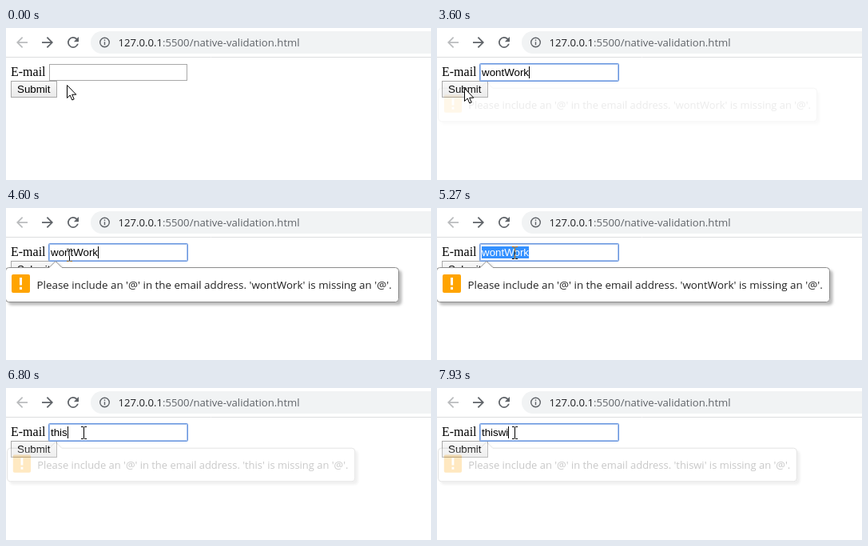
Recreate the animation shown at these times as an HTML page. Size 532 by 190 pixels, loop 8 s.

```html
<!DOCTYPE html>
<html lang="en">
<head>
<meta charset="utf-8">
<title>Native form validation</title>
<style>
  html, body { margin: 0; width: 100%; height: 100%; overflow: hidden; background: #fff; }
  svg { display: block; width: 532px; height: 190px; }
  .ui { font-family: "Open Sans", "Noto Sans", sans-serif; }
  .control { font: 13.333px "Liberation Sans", Arial, sans-serif; }
  .label { font: 16px "Liberation Serif", "Times New Roman", serif; }
  #ibeam { mix-blend-mode: difference; }
</style>
</head>
<body>
<svg viewBox="0 0 532 190">
  <defs>
    <linearGradient id="face" x2="0" y2="1">
      <stop stop-color="#f9f9f9"/><stop offset="1" stop-color="#e9e9e9"/>
    </linearGradient>
    <filter id="shadow" x="-5%" y="-20%" width="112%" height="160%">
      <feDropShadow dx="3.5" dy="3.5" stdDeviation="1.8" flood-opacity=".26"/>
    </filter>
    <path id="leftArrow" d="M8 -1H-4.2L1.4 -6.6L0 -8L-8 0L0 8L1.4 6.6L-4.2 1H8Z"/>
  </defs>
  <rect width="532" height="190" fill="#fff"/>

  <!-- Browser toolbar -->
  <path d="M0 36.5H532" stroke="#dcdddf"/>
  <use href="#leftArrow" transform="translate(20 18) scale(.875)" fill="#babcbe"/>
  <use href="#leftArrow" transform="translate(52 18) scale(-.875 .875)" fill="#5f6368"/>
  <path transform="translate(84 18) scale(.875)" fill="#5f6368"
    d="M5.65 -5.65A8 8 0 1 0 7.73 2H5.65A6 6 0 1 1 4.22 -4.22L1 -1H8V-8Z"/>
  <rect x="106" y="4" width="460" height="28" rx="14" fill="#f1f3f4"/>
  <g fill="none" stroke="#5f6368" stroke-width="1.4">
    <circle cx="123.5" cy="18" r="5.8"/>
    <path d="M123.5 17.2V21.2M123.5 14.6V16"/>
  </g>
  <text class="ui" x="140.5" y="23" font-size="13.15" fill="#5f6368"><tspan fill="#202124">127.0.0.1</tspan>:5500/native-validation.html</text>

  <!-- Form -->
  <text class="label" x="6" y="60">E-mail</text>
  <rect x="6.5" y="66.5" width="57" height="20" fill="url(#face)" stroke="#a9a9a9"/>
  <text class="control" x="14" y="81">Submit</text>
  <rect x="54.5" y="45.5" width="172" height="20" fill="#fff" stroke="#a9a9a9"/>
  <g id="focus" fill="none">
    <rect x="54.5" y="45.5" width="172" height="20" stroke="#a8c3ee"/>
    <rect x="53.5" y="44.5" width="174" height="22" rx="1" stroke="#6795de"/>
  </g>
  <rect id="selection" x="56" y="48" height="15" fill="#3390ff"/>
  <text id="value" class="control" x="56" y="60"></text>
  <rect id="caret" y="48" width="1" height="15"/>
  <rect id="suggestions" x="53.5" y="67.5" width="203" height="130" fill="#fff" stroke="#c8c8c8"/>

  <g id="bubble">
    <path id="frame" fill="#fff" stroke="#8c8c8c" filter="url(#shadow)"/>
    <rect x="7" y="83" width="23" height="23" rx="2" fill="#ffa400"/>
    <path d="M17 87H20V96.5H17ZM17 98.8H20V102H17Z" fill="#fff"/>
    <text id="message" class="ui" x="38.5" y="101" font-size="13.38" fill="#222"></text>
  </g>

  <path id="arrow" d="M.5 .5V16.5L4.2 13L6.8 19L9.2 18L6.7 12.2H11.8Z" fill="#fff" stroke="#000"/>
  <path id="ibeam" d="M-3.5 -7.5H-1L0 -6.8L1 -7.5H3.5M0 -7V7M-3.5 7.5H-1L0 6.8L1 7.5H3.5" fill="none" stroke="#fff"/>
</svg>
<script>
const LOOP = 8000, FPS = 15;
const FOCUS = 470, SUBMIT = 3530, SELECT = 5070;

// [time, typed value]
const typing = [
  [930, "w"], [1070, "wo"], [1200, "won"], [1330, "wont"],
  [1670, "wontW"], [1800, "wontWo"], [1930, "wontWor"], [2130, "wontWork"],
  [6270, "t"], [6400, "th"], [6530, "thi"], [6670, "this"],
  [7470, "thisw"], [7800, "thiswi"]
];
const RETYPE = 6270;

// [time, x, y] of the pointer's hot spot
const pointer = [
  [0, 75, 71], [200, 95, 52], [3000, 95, 52], [3400, 34, 75],
  [4260, 34, 75], [4730, 95, 53], [4800, 97, 56], [LOOP, 97, 56]
];

const ui = Object.fromEntries([...document.querySelectorAll("[id]")].map(el => [el.id, el]));
const show = (el, on) => el.setAttribute("visibility", on ? "visible" : "hidden");
const smooth = p => { p = Math.min(1, Math.max(0, p)); return p * p * (3 - 2 * p); };

function pointerAt(t) {
  const i = Math.max(1, pointer.findIndex(k => k[0] >= t));
  const [t0, x0, y0] = pointer[i - 1], [t1, x1, y1] = pointer[i];
  const p = (t - t0) / (t1 - t0);
  return [Math.round(x0 + (x1 - x0) * p), Math.round(y0 + (y1 - y0) * p)];
}

function drawField(t, value, lastKey) {
  const selected = t >= SELECT && t < RETYPE;
  ui.value.textContent = value;
  ui.value.setAttribute("fill", selected ? "#fff" : "#000");
  const width = ui.value.getComputedTextLength();
  ui.selection.setAttribute("width", width);
  ui.caret.setAttribute("x", Math.round(56 + width));
  show(ui.focus, t >= FOCUS);
  show(ui.selection, selected);
  const active = Math.max(lastKey, t >= SUBMIT ? SUBMIT : FOCUS);
  show(ui.caret, t >= FOCUS && !selected && (t - active) % 1000 < 500);
  show(ui.suggestions, t >= FOCUS && t < typing[0][0]);
}

function drawBubble(t, value, lastKey) {
  show(ui.bubble, t >= SUBMIT);
  if (t < SUBMIT) return;
  const age = t - Math.max(SUBMIT, lastKey);
  ui.message.textContent = `Please include an '@' in the email address. '${value}' is missing an '@'.`;
  const right = Math.round(38.5 + ui.message.getComputedTextLength() + 8) + .5;
  ui.frame.setAttribute("d",
    `M3.5 74.5H54L62 66.5L70 74.5H${right - 4}q4 0 4 4V113.5q0 4 -4 4H3.5q-4 0 -4 -4V78.5q0 -4 4 -4Z`);
  const scale = .964 + .036 * smooth(age / 750);
  ui.bubble.setAttribute("opacity", smooth(age / 430));
  ui.bubble.setAttribute("transform", `translate(62 96) scale(${scale}) translate(-62 -96)`);
}

function drawPointer(t) {
  const [x, y] = pointerAt(t);
  const overField = x > 54 && x < 227 && y > 45 && y < 66;
  show(ui.ibeam, overField);
  show(ui.arrow, !overField);
  ui.ibeam.setAttribute("transform", `translate(${x + .5} ${y})`);
  ui.arrow.setAttribute("transform", `translate(${x} ${y})`);
}

const start = performance.now();
function draw() {
  const elapsed = (performance.now() - start) % LOOP;
  // The screen is sampled at a fixed rate; 5 ms absorbs rounding of the event times.
  const t = Math.floor((elapsed + 5) * FPS / 1000) * 1000 / FPS + 5;
  const [lastKey, value] = typing.findLast(k => k[0] <= t) || [0, ""];
  drawField(t, value, lastKey);
  drawBubble(t, value, lastKey);
  drawPointer(Math.min(t, LOOP));
  requestAnimationFrame(draw);
}
draw();
</script>
</body>
</html>
```
